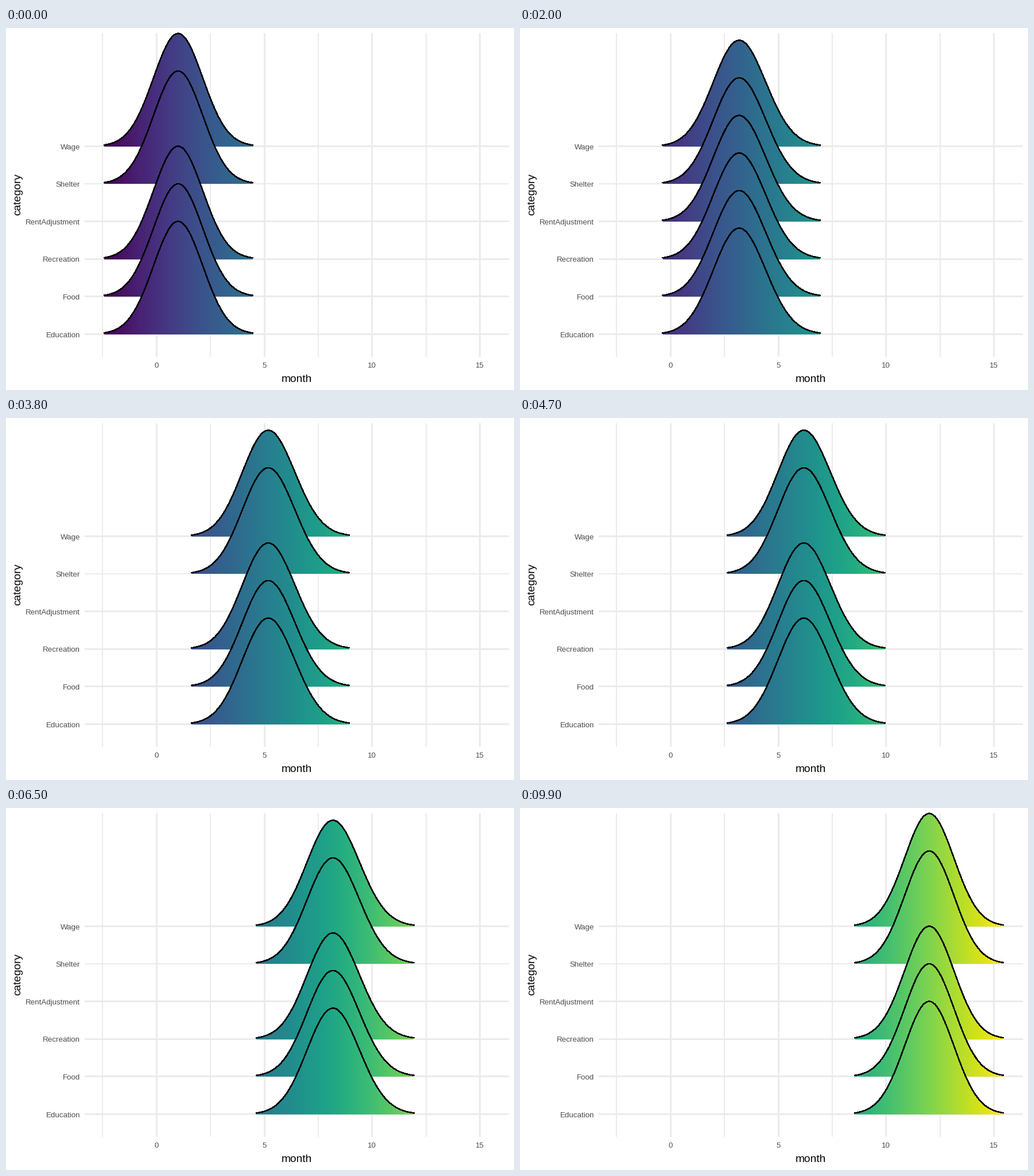
A matplotlib script for the animation above (10000 ms loop, 885x632 px).

```python
import numpy as np
import matplotlib.pyplot as plt
from matplotlib.animation import FuncAnimation

W, H, DPI = 885, 632, 100
FRAMES, INTERVAL = 100, 100
PX = 72 / DPI  # points per pixel

plt.rcParams["font.family"] = "Liberation Sans"

# Data space: months 1..12 smoothed with one shared Gaussian bandwidth
BW = 1.1425
LO, HI = 1 - 3 * BW, 12 + 3 * BW
GRID = np.linspace(LO, HI, 512)
MIN_HEIGHT = 0.01

# Panel geometry in pixels
X0, X_UNIT = 262.3, 37.553
STEP, BOTTOM = 65.6, 534.4
LEFT, RIGHT, TOP, FLOOR = 137.6, 875.2, 9.4, 573.4
PEAK = 3 * STEP

CATEGORIES = ["Education", "Food", "Recreation", "RentAdjustment",
              "Shelter", "Wage"]
ACTIVE = {"RentAdjustment": (3, 4)}  # months in which a ridge exists

# Pixel centres of the panel columns and their colours
COLS = np.arange(int(LEFT), int(RIGHT)) + 0.5
SHADES = plt.get_cmap("viridis")(((COLS - X0) / X_UNIT - LO) / (HI - LO))


def px(month):
    return X0 + X_UNIT * np.asarray(month)


def kernel(center):
    return np.exp(-((GRID - center) / BW) ** 2 / 2)


fig = plt.figure(figsize=(W / DPI, H / DPI), dpi=DPI, facecolor="white")
ax = fig.add_axes([0, 0, 1, 1])
ax.axis("off")


def stroke(xs, ys, width, color, zorder, cap="butt"):
    line, = ax.plot(xs, ys, color=color, lw=width * PX, zorder=zorder,
                    solid_capstyle=cap, antialiased=False, snap=False)
    return line


def rule(xs, ys, width):
    stroke(xs, ys, width, "#EBEBEB", 1)


def label(x, y, s, size, color, **kw):
    ax.text(x, y, s, fontsize=size * PX, color=color, va="baseline",
            rotation_mode="anchor", **kw)


for m in (-2.5, 2.5, 7.5, 12.5):
    rule([px(m)] * 2, [TOP, FLOOR], 1)
for m in (0, 5, 10, 15):
    rule([px(m)] * 2, [TOP, FLOOR], 2)
    label(px(m), 593.2, str(m), 13.4, "#4D4D4D", ha="center")

label(506, 618, "month", 19.2, "black", ha="center")
label(25.3, 290.5, "category", 19.2, "black", ha="center", rotation=90)


class Ridge:
    def __init__(self, row, name):
        self.base = BOTTOM - row * STEP
        self.span = ACTIVE.get(name, (1, 12))
        rule([LEFT, RIGHT], [self.base] * 2, 2)
        label(129, self.base + 5.2, name, 13.4, "#4D4D4D", ha="right")

        top, foot = int(self.base - PEAK), int(self.base) + 1
        self.rows = np.arange(top, foot)[:, None] + 0.5
        self.pixels = np.repeat(SHADES[None], foot - top, axis=0)
        z = 20 - 2 * row
        self.fill = ax.imshow(
            self.pixels, aspect="auto", interpolation="nearest", zorder=z,
            extent=(COLS[0] - 0.5, COLS[-1] + 0.5, foot, top))
        self.line = stroke([], [], 1.42, "black", z + 1, "projecting")

    def draw(self, month, x, height):
        first, last = self.span
        shown = first <= month <= last
        self.fill.set_visible(shown)
        self.line.set_visible(shown)
        if not shown:
            return
        level = np.interp(COLS, x, height, left=-1, right=-1)
        inside = ((self.rows > self.base - PEAK * level)
                  & (self.rows < self.base + 0.4))
        self.pixels[..., 3] = inside
        self.fill.set_data(self.pixels)
        self.line.set_data(x, self.base - PEAK * height)


ridges = [Ridge(i, name) for i, name in enumerate(CATEGORIES)]
ax.set_xlim(0, W)
ax.set_ylim(H, 0)


def update(i):
    whole, part = divmod(i % FRAMES, 9)
    start, f = 1 + whole, part / 9
    # Neighbouring months cross-blend point by point
    height = (1 - f) * kernel(start) + f * kernel(start + 1)
    keep = height >= MIN_HEIGHT
    x, height = px(GRID[keep]), height[keep]
    for ridge in ridges:
        ridge.draw(start + f, x, height)
    return []


def reset():
    return update(0)


anim = FuncAnimation(fig, update, frames=FRAMES, init_func=reset,
                     interval=INTERVAL, repeat=True, repeat_delay=0,
                     blit=False)
plt.show()
```
